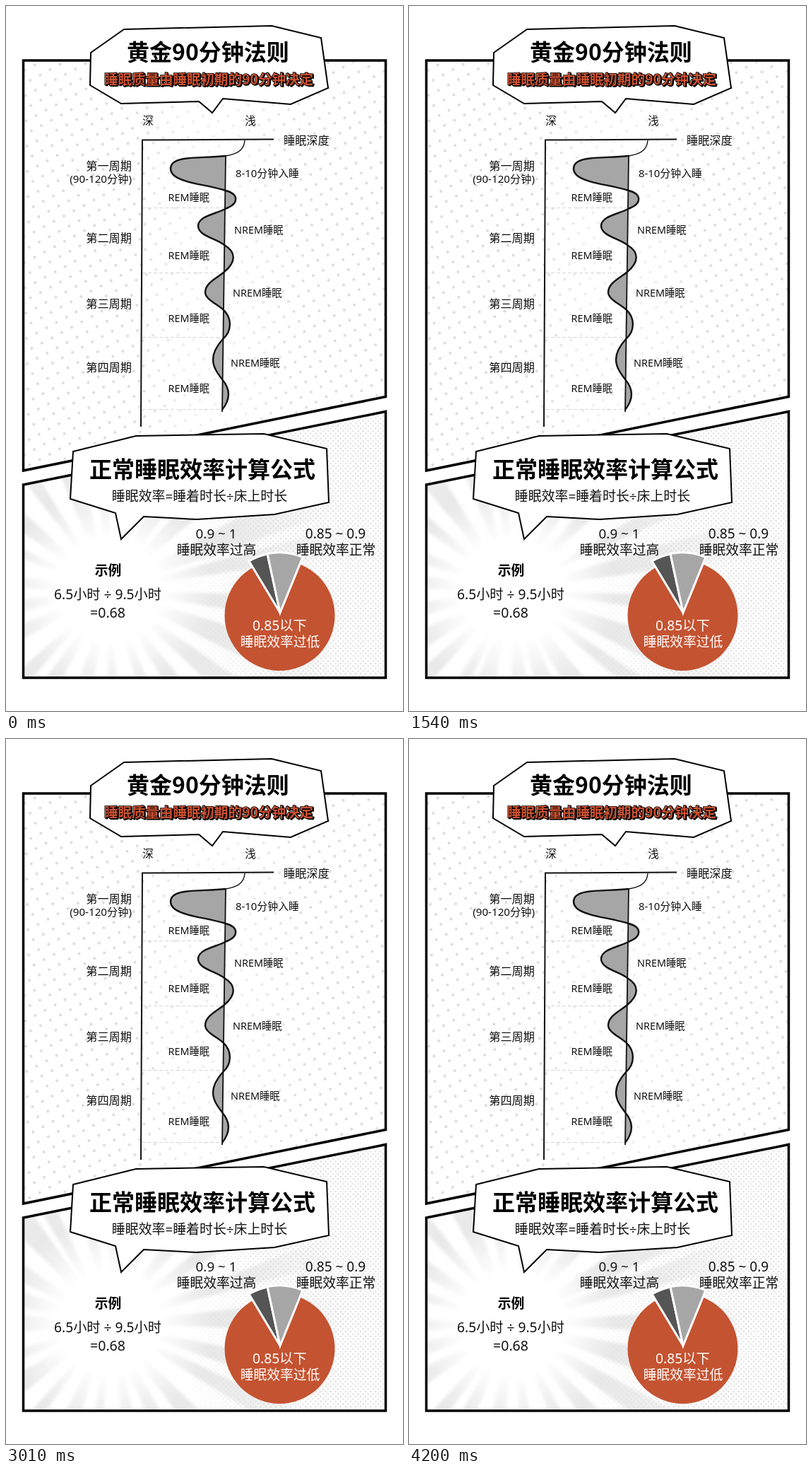
Recreate the animation shown at these times as an HTML page. Size 562x997 px, loop 4.27 s.

```html
<!DOCTYPE html>
<html lang="zh-CN">
<head>
<meta charset="utf-8">
<style>
html, body { margin: 0; width: 100%; height: 100%; overflow: hidden; background: #fff; }
svg { display: block; width: 100vw; height: 100vh; }
text { font-family: "Noto Sans", "Noto Sans CJK SC", "Noto Sans CJK", sans-serif; font-weight: 500; fill: #111; }
.bold, .accent, .shade { font-family: "Noto Sans CJK SC", "Noto Sans CJK", sans-serif; font-weight: 900; fill: #000; }
.accent, .shade { stroke: #000; stroke-width: 1.6; paint-order: stroke; }
.accent { fill: #cb5030; }
.light { fill: #fff; }
</style>
</head>
<body>
<svg viewBox="0 0 562 997" preserveAspectRatio="none">
  <defs>
    <pattern id="dots" width="16" height="16" patternUnits="userSpaceOnUse" patternTransform="translate(30 80) rotate(-28)">
      <circle cx="8" cy="8" r="2.1" fill="#dcdcdc"/>
    </pattern>
    <pattern id="fine" width="5" height="5" patternUnits="userSpaceOnUse" patternTransform="rotate(45)">
      <circle cx="2.5" cy="2.5" r="1.35" fill="#e0e0e0"/>
    </pattern>
    <linearGradient id="sides">
      <stop offset=".3" stop-color="#fff"/>
      <stop offset=".45" stop-color="#777"/>
      <stop offset=".6" stop-color="#777"/>
      <stop offset=".78" stop-color="#fff"/>
    </linearGradient>
    <mask id="sideMask"><rect x="24" y="70" width="514" height="600" fill="url(#sides)"/></mask>
    <linearGradient id="right">
      <stop offset=".44" stop-color="#000"/>
      <stop offset=".68" stop-color="#fff"/>
    </linearGradient>
    <mask id="rightMask"><rect x="24" y="560" width="514" height="400" fill="url(#right)"/></mask>
    <radialGradient id="glow" gradientUnits="userSpaceOnUse" cx="0" cy="0" r="350">
      <stop offset=".2" stop-color="#d8d8d8" stop-opacity="0"/>
      <stop offset=".42" stop-color="#d8d8d8" stop-opacity=".58"/>
      <stop offset=".6" stop-color="#d8d8d8" stop-opacity=".46"/>
      <stop offset="1" stop-color="#d8d8d8" stop-opacity="0"/>
    </radialGradient>
    <filter id="soft" filterUnits="userSpaceOnUse" x="-400" y="-400" width="800" height="800">
      <feGaussianBlur stdDeviation="2"/>
    </filter>
    <clipPath id="lower"><path d="M24 677L538 573V950H24Z"/></clipPath>
  </defs>

  <!-- panels -->
  <path d="M24 77H538V552L24 657Z" fill="url(#dots)" mask="url(#sideMask)"/>
  <g clip-path="url(#lower)">
    <path d="M24 677L538 573V950H24Z" fill="url(#fine)" mask="url(#rightMask)"/>
    <g transform="translate(146 826)">
      <g id="spin"><path id="rays" fill="url(#glow)" filter="url(#soft)"/></g>
    </g>
  </g>
  <g fill="none" stroke="#000" stroke-width="3.5">
    <path d="M24.5 77H537.5V552.5L24.5 657Z"/>
    <path d="M24.5 677L537.5 573.5V950H24.5Z"/>
  </g>
  <g fill="#fff" stroke="#000" stroke-width="2">
    <path d="M120 66L167 33L376 28L446 45L456 116L403 139L307 131L292 151L273 135L163 138L119 112Z"/>
    <path d="M95 630L184 608L365 605L454 626L457 702L380 719L270 726L195 722L163 754L155 717L91 697Z"/>
  </g>

  <!-- sleep curve -->
  <path d="M193 285.500H308M193 377.500H308M193 468.500H306M193 570.500H306" stroke="#d6d6d6" stroke-dasharray="5 3"/>
  <g fill="none" stroke="#111" stroke-width="2">
    <path d="M379 188.500L193 189.500L191 595"/>
    <path d="M338 190C337 207 322 210 311 212" stroke-width="1.4"/>
    <path fill="#a6a6a6" stroke-width="2.400" d="M311 212C270 216 233 211 233 230C233 250 280 251 311 261
      C330 266 330 280 310 287C298 294 272 297 272 311C272 325 298 329 309 338
      C326 348 326 362 309 376C300 384 282 391 282 405C282 415 300 422 308 430
      C320 441 320 460 307 471C299 480 293 490 293 500C293 511 300 520 306 528C318 542 318 556 306 571"/>
    <path d="M311 211L306 574" stroke-width="1.8"/>
  </g>

  <!-- pie -->
  <circle cx="387.500" cy="862" r="78" fill="#c45331"/>
  <g stroke="#fff" stroke-width="3">
    <path d="M388 858L344 785A84 84 0 0 1 370 775Z" fill="#555"/>
    <path d="M388 858L370 774.500A84 84 0 0 1 420 779.500Z" fill="#a6a6a6"/>
  </g>
  <g id="labels"></g>
</svg>
<script>
const LOOP = 4270, STEP = 70;
const $ = id => document.getElementById(id);

// x, vertical centre, size, text, anchor, class
function label(x, y, size, text, anchor = 'middle', cls = '') {
  const el = document.createElementNS('http://www.w3.org/2000/svg', 'text');
  const attrs = { x, y: y + size * 0.38, 'font-size': size, 'text-anchor': anchor, class: cls };
  for (const key in attrs) el.setAttribute(key, attrs[key]);
  el.textContent = text;
  $('labels').append(el);
}

const subtitle = '睡眠质量由睡眠初期的90分钟决定';
label(286, 65, 32, '黄金90分钟法则', 'middle', 'bold');
label(288.5, 105, 19.5, subtitle, 'middle', 'shade');
label(287, 103.5, 19.5, subtitle, 'middle', 'accent');
label(201, 162, 15.5, '深');
label(346, 162, 15.5, '浅');
label(393, 190, 16.2, '睡眠深度', 'start');
[226, 328, 421, 511].forEach((y, i) => label(178, y, 16.2, `第${'一二三四'[i]}周期`, 'end'));
label(178, 244, 15.2, '(90-120分钟)', 'end');
label(325, 236, 14.9, '8-10分钟入睡', 'start');
[271, 353, 442, 541].forEach(y => label(288, y, 14.3, 'REM睡眠', 'end'));
[[323, 317], [321, 406], [318, 505]].forEach(([x, y]) => label(x, y, 14.4, 'NREM睡眠', 'start'));
label(278, 655, 32, '正常睡眠效率计算公式', 'middle', 'bold');
label(274, 693, 18.9, '睡眠效率=睡着时长÷床上时长');
label(144.5, 798, 18.8, '示例', 'middle', 'bold');
label(144, 832, 19.2, '6.5小时 ÷ 9.5小时');
label(144, 858, 19.5, '=0.68');
label(297.5, 746, 18.8, '0.9 ~ 1');
label(298, 768.5, 18.8, '睡眠效率过高');
label(466.5, 746, 19, '0.85 ~ 0.9');
label(467, 768.5, 18.8, '睡眠效率正常');
label(387.5, 875.5, 19.3, '0.85以下', 'middle', 'light');
label(388, 898.5, 18.8, '睡眠效率过低', 'middle', 'light');

// uneven sunburst wedges
let seed = 11;
const rand = () => (seed = seed * 16807 % 2147483647) / 2147483647;
const RAYS = 22, R = 350;
const rim = a => `${(R * Math.cos(a)).toFixed(1)} ${(R * Math.sin(a)).toFixed(1)}`;
let d = '';
rand();
for (let i = 0; i < RAYS; i++) {
  const a = (i + rand() * 0.25) * 2 * Math.PI / RAYS;
  d += `M0 0L${rim(a)}L${rim(a + 0.1 + rand() * 0.09)}Z`;
}
$('rays').setAttribute('d', d);

function draw(now) {
  const t = Math.floor(now % LOOP / STEP) * STEP;
  $('spin').setAttribute('transform', `rotate(${360 * t / LOOP})`);
  requestAnimationFrame(draw);
}
requestAnimationFrame(draw);
</script>
</body>
</html>
```
